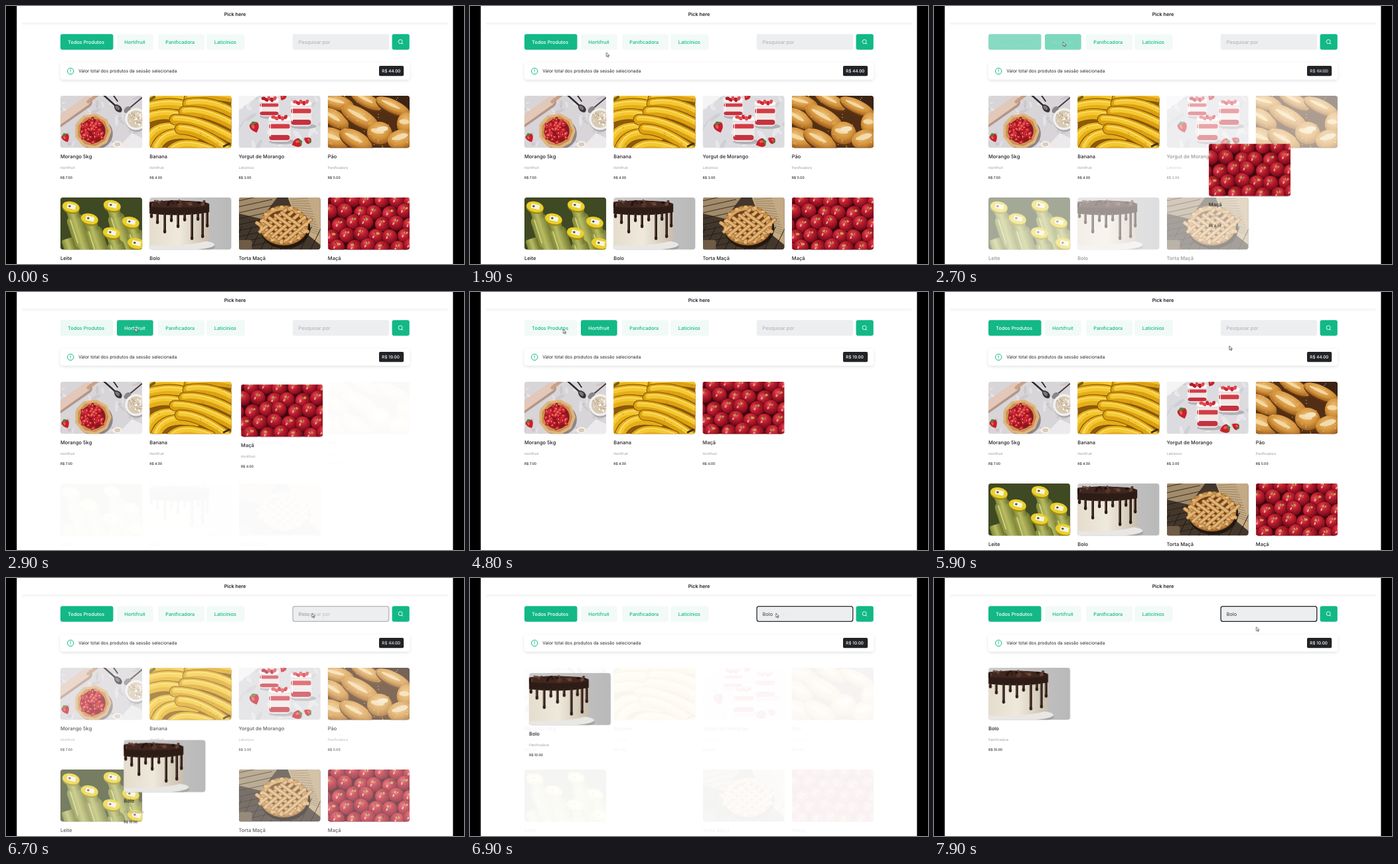
An HTML page for the animation above (8000 ms loop, 690x388 px).

```html
<!DOCTYPE html>
<html lang="pt">
<head>
<meta charset="utf-8">
<title>Pick here</title>
<style>
html, body { margin: 0; width: 100%; height: 100%; overflow: hidden; background: #fff; }
svg { display: block; width: 100vw; height: 100vh; }
text { font-family: Inter, "Open Sans", sans-serif; text-rendering: geometricPrecision; white-space: pre; }
.main, .hort, .all, .keep, .find, .to-third, .to-first {
  animation: 8s cubic-bezier(.4, 0, .1, 1) infinite;
}
.main { animation-name: main; }
.hort { animation-name: hort; }
.all { animation-name: all; }
.keep { animation-name: keep; }
.find { animation-name: find; }
.to-third { animation-name: to-third; }
.to-first { animation-name: to-first; }
.cursor { animation: cursor 8s ease-in-out infinite; }

/* filter at 2556 ms, reset at 4950 ms, search at 6590 ms, 450 ms each */
@keyframes main {
  0%, 31.95% { opacity: 1; }
  37.575%, 61.875% { opacity: 0; }
  67.5%, 100% { opacity: 1; }
}
@keyframes hort {
  0%, 31.95% { opacity: 0; }
  37.575%, 61.875% { opacity: 1; }
  67.5%, 100% { opacity: 0; }
}
@keyframes all {
  0%, 31.95% { opacity: 1; }
  37.575%, 61.875% { opacity: 0; }
  67.5%, 82.375% { opacity: 1; }
  88%, 100% { opacity: 0; }
}
@keyframes keep {
  0%, 82.375% { opacity: 1; }
  88%, 100% { opacity: 0; }
}
@keyframes find {
  0%, 82.375% { opacity: 0; }
  88%, 100% { opacity: 1; }
}
@keyframes to-third {
  0%, 31.95% { transform: translate(0, 0); }
  37.575%, 61.875% { transform: translate(-134.5px, -153px); }
  67.5%, 100% { transform: translate(0, 0); }
}
@keyframes to-first {
  0%, 82.375% { transform: translate(0, 0); }
  88%, 100% { transform: translate(-134.3px, -153px); }
}
@keyframes cursor {
  0%, 10.6% { transform: translate(400px, 235px); opacity: 0; }
  10.7% { transform: translate(400px, 235px); opacity: 1; animation-timing-function: linear; }
  15.6% { transform: translate(338px, 182px); animation-timing-function: linear; }
  23.75% { transform: translate(205.5px, 70px); animation-timing-function: ease-out; }
  26.5%, 50% { transform: translate(194.5px, 54px); }
  53.75%, 65% { transform: translate(140.5px, 56px); }
  73.75% { transform: translate(445px, 81px); }
  79%, 95.6% { transform: translate(461px, 53px); }
  98.75%, 100% { transform: translate(485.5px, 73.5px); opacity: 1; }
}
</style>
</head>
<body>
<svg id="stage" viewBox="0 0 690 388">
  <defs>
    <clipPath id="photo"><rect width="123.2" height="78.3" rx="4"/></clipPath>
    <radialGradient id="apple" cx=".4" cy=".32" r=".7">
      <stop offset="0" stop-color="#e2545a"/><stop offset=".4" stop-color="#c01e30"/><stop offset="1" stop-color="#6d0a18"/>
    </radialGradient>
    <radialGradient id="bread" cx=".45" cy=".35" r=".7">
      <stop offset="0" stop-color="#eebf74"/><stop offset=".55" stop-color="#d4933c"/><stop offset="1" stop-color="#8f5318"/>
    </radialGradient>
    <linearGradient id="wall">
      <stop offset="0" stop-color="#cdcccb"/><stop offset="1" stop-color="#b9b9ba"/>
    </linearGradient>
    <linearGradient id="cream">
      <stop offset="0" stop-color="#e4ddcd"/><stop offset=".5" stop-color="#efe9dc"/><stop offset="1" stop-color="#c9beac"/>
    </linearGradient>
    <linearGradient id="bottle" x1="0" x2="1" y1="0" y2="0">
      <stop offset="0" stop-color="#7f8735"/><stop offset=".45" stop-color="#b9bc62"/><stop offset="1" stop-color="#6a722c"/>
    </linearGradient>
    <linearGradient id="edge" x2="0" y2="1">
      <stop offset="0" stop-color="#f1f1f2"/><stop offset="1" stop-color="#fff"/>
    </linearGradient>
    <filter id="soft" x="-5%" y="-50%" width="110%" height="220%">
      <feDropShadow dx="0" dy="1.5" stdDeviation="2" flood-color="#000" flood-opacity=".13"/>
    </filter>
  </defs>
</svg>
<script>
const GREEN = '#12b886', INK = '#202126';
let seed = 7;
const rnd = (a = 1, b = 0) => {
  seed = (seed * 16807) % 2147483647;
  return b + (a - b) * seed / 2147483647;
};
const pick = list => list[Math.floor(rnd() * list.length)];
const times = (n, fn) => Array.from({ length: n }, (_, i) => fn(i)).join('');

const box = (x, y, w, h, fill, r = 0, more = '') =>
  `<rect x="${x}" y="${y}" width="${w}" height="${h}" rx="${r}" fill="${fill}" ${more}/>`;
const oval = (x, y, rx, ry, fill, turn = 0) =>
  `<ellipse cx="${x}" cy="${y}" rx="${rx}" ry="${ry}" fill="${fill}" transform="rotate(${turn} ${x} ${y})"/>`;
const shape = (d, fill) => `<path d="${d}" fill="${fill}"/>`;
const line = (d, w, color) =>
  `<path d="${d}" fill="none" stroke="${color}" stroke-width="${w}" stroke-linecap="round" stroke-linejoin="round"/>`;
const text = (x, y, str, size, fill = INK, weight = 400, more = '') =>
  `<text x="${x}" y="${y}" font-size="${size}" fill="${fill}" font-weight="${weight}" ${more}>${str}</text>`;
const group = (cls, body) => `<g class="${cls}">${body}</g>`;
const full = fill => box(0, 0, 124, 79, fill);

const berry = (x, y, s, turn) =>
  `<g transform="translate(${x} ${y}) rotate(${turn}) scale(${s})">` +
  shape('M0 7Q-7 1-5-4Q0-7 5-4Q7 1 0 7', '#c8202c') + oval(-1.5, -1, 1.6, 2.4, '#ea5a58') +
  shape('M-5-4L0-7L5-4L0-3Z', '#5c7a35') + '</g>';

function strawberryPie() {
  const rim = times(9, i => {
    const a = i * Math.PI * 2 / 9;
    return `${i ? 'L' : 'M'}${49 + 26 * Math.cos(a)} ${53 + 25 * Math.sin(a)}`;
  }) + 'Z';
  return full('#d8d5d8') +
    times(40, () => oval(rnd(124), rnd(79), rnd(9, 2), rnd(3, 1), pick(['#e4e2e4', '#cbc8cd']), rnd(180))) +
    line('M-6 42L40 10', 16, '#b69585') + line('M-6 40L39 8', 13, '#e2c8b8') + line('M42 9L58-3', 5, '#c99f84') +
    line('M64-2L82 14', 2.5, '#2c2a2d') + oval(87, 19, 7, 4.5, '#37353a', 45) + oval(86, 18, 4, 2.4, '#77747a', 45) +
    line('M79-2L86 8', 2, '#3a3434') + line('M124 2L106 17', 2, '#4a3f3c') + oval(101, 21, 6, 4, '#8c8482', -40) +
    oval(115, 37, 17, 17, '#a9a5aa') + oval(114, 35, 16.5, 16.5, '#f2f0ef') + oval(114, 35, 13, 13, '#d8c9b2') +
    times(45, () => oval(rnd(124, 104), rnd(45, 26), 1.4, .9, pick(['#efe5d3', '#b8a387', '#fff']), rnd(180))) +
    shape('M86 79L108 56L124 64V79Z', '#eceaec') +
    oval(52, 57, 27, 24, '#8d8488') + shape(rim, '#c98f53') + line(rim, 4, '#e0b57c') + oval(49, 53, 19, 18, '#8f1620') +
    times(48, () => {
      const a = rnd(6.28), r = 18 * Math.sqrt(rnd());
      const x = 49 + r * Math.cos(a), y = 53 + r * Math.sin(a), t = rnd(180);
      return oval(x, y, 3.8, 2.4, pick(['#c91f2d', '#b11824', '#dc3b3e']), t) + oval(x, y, 1.7, .8, '#ef8b80', t);
    }) +
    berry(8, 63, 1.05, -25) + oval(86, 73, 7, 5, '#f4f2f2') + oval(86, 73, 4.5, 3, '#dccbb5');
}

function bananas() {
  const curves = [
    'M-5 4Q30-6 62 8', 'M60 4Q90-6 130 4', 'M-5 18Q40 4 78 24', 'M58 12Q94 6 130 28',
    'M-5 34Q30 18 74 42', 'M52 24Q84 20 130 46', 'M-6 82Q-2 44 40 48', 'M38 36Q72 34 128 66',
    'M8 84Q18 48 70 60', 'M46 50Q76 50 118 82', 'M30 86Q46 64 92 82'];
  return full('#8a5b0c') + curves.map((d, i) =>
    line(d, 17, '#7d510a') + line(d, 15, i % 2 ? '#dca012' : '#e6ae18') +
    `<g transform="translate(0 -2)">${line(d, 7, '#f4c830')}</g>` +
    `<g transform="translate(0 -4)">${line(d, 1.3, '#fae07a')}</g>`).join('') +
    line('M-3 8L7 2', 4, '#77611b') + line('M112 76L120 72', 3, '#3f300e') +
    times(18, () => oval(rnd(124), rnd(78), .8, .4, '#8a5d14', rnd(180)));
}

function jar(x, y, w, h) {
  const mid = x + w / 2;
  return oval(mid + 4, y + h, w * .6, 4, '#b2b1b7') + box(x, y, w, h, '#f0e9e8', 6) +
    box(x + 1, y + h * .3, w - 2, h * .18, '#d23c46', 2) + box(x + 1, y + h * .74, w - 2, h * .2, '#c4323f', 4) +
    oval(mid, y + 3, w / 2, 4.5, '#fdfbfa') +
    times(5, i => oval(x + w * (.22 + i * .14), y + 1 + (i % 2) * 2, 3.4, 2.6, pick(['#cf2534', '#e24a50', '#b31a2a']), 30 * i)) +
    line(`M${x + 3} ${y + 9}V${y + h - 8}`, 1, '#fff') + line(`M${x} ${y + 8}H${x + w}`, .6, '#c9c4c8');
}

const yogurt = () => full('#dcdce0') +
  times(30, () => oval(rnd(124), rnd(79), rnd(12, 3), rnd(4, 1), pick(['#e8e8eb', '#cfd0d6']), rnd(180))) +
  shape('M0 0H30L0 22Z', '#f4f4f5') + jar(31, 3, 30, 28) + jar(78, 8, 32, 38) + jar(45, 31, 33, 38) +
  berry(24, 47, 1.3, -20) + berry(88, 71, 1.2, 70) + berry(104, 67, .9, 120) + berry(67, 2, .8, 30);

const rolls = () => full('#512e14') + shape('M70 0H124V24Z', '#3c2415') +
  [[14, 10, 26, 11, 15], [58, 7, 26, 10, 28], [98, 16, 28, 10, 25], [10, 34, 24, 12, 32], [48, 32, 32, 13, 30],
    [8, 64, 26, 15, 20], [42, 66, 27, 13, 28], [118, 42, 14, 17, 5], [78, 56, 19, 17, 10], [110, 66, 20, 15, -10]]
    .map(([x, y, a, b, t]) => oval(x + 1, y + 2, a + 1, b + 1, '#5f3410', t) + oval(x, y, a, b, 'url(#bread)', t) +
      oval(x - 3, y - 3, a * .55, b * .22, '#f4d9a2', t)).join('') +
  oval(82, 50, 9, 4, '#f4e3c0', -8) + oval(111, 61, 10, 4, '#f0dcb4', -15) +
  times(60, () => oval(rnd(124), rnd(79), .7, .5, '#f6e4bd'));

const bottles = () => full('#3f4923') +
  [[78, 12], [16, 14], [44, 32], [106, 37], [77, 53], [114, 69], [10, 62]].map(([x, y], i) =>
    `<g transform="rotate(-18 ${x} ${y})">` + box(x - 13, y + 13, 26, 62, 'url(#bottle)', 9) +
    box(x - 9, y, 18, 20, 'url(#bottle)', 3) + line(`M${x - 7} ${y + 18}V${y + 55}`, 1.6, '#d4d68c') + '</g>' +
    (i < 6 ? oval(x, y + 2, 13, 8.5, '#9f8b16', 12) + oval(x, y, 13, 8, '#ead02b', 12) +
      box(x - 6, y - 4, 13, 7, '#f5f3e4', 1, `transform="rotate(14 ${x} ${y})"`) +
      oval(x - 2, y - 1, 1.8, 1.6, '#514b28') : '')).join('');

function cake() {
  const drips = [[3, 28], [12, 37], [23, 51], [33, 34], [43, 43], [53, 33], [64, 61], [73, 32], [80, 58], [87, 42]];
  return full('url(#wall)') + oval(35, 74, 64, 10, '#a5a3a2') + oval(35, 71, 63, 9, '#e9e7e4') +
    shape('M-2 12H90V64Q60 74-2 72Z', 'url(#cream)') +
    shape('M-2 8Q40 0 90 10V22Q50 30-2 24Z', '#2e1c17') + oval(40, 10, 50, 5.5, '#40271f') +
    drips.map(([x, y]) => line(`M${x} 18V${y}`, 3.6, '#2e1c17') + oval(x, y, 2.2, 3, '#2e1c17') +
      line(`M${x - .8} 24V${y - 2}`, .6, '#75584b')).join('') +
    times(26, () => oval(rnd(86), rnd(12, 5), rnd(4, 1.5), rnd(2.2, 1), pick(['#573528', '#24140f', '#6b4638']), rnd(180)));
}

function applePie() {
  const lattice = [-24, -12, 0, 12, 24].map(k =>
    [`M${k - 28} ${k * -.4 - 12}L${k + 22} ${k * -.4 + 24}`, `M${k - 22} ${k * .4 + 24}L${k + 28} ${k * .4 - 18}`]).flat();
  return full('#43372c') + shape('M0 0H58L34 32L0 24Z', '#a18b6a') + shape('M74 0H124V72L92 46Z', '#c3aa84') +
    times(15, i => line(`M${78 + i} ${3 + i * 3}L${104 + i * 1.4} ${1 + i * 4}`, .5, '#6d5c47')) +
    times(9, i => line(`M0 ${i * 9 + 5}L50 ${i * 9 - 6}`, .8, '#1d1814')) +
    times(9, i => line(`M${i * 15 - 12} 79L${i * 15 + 5} 44`, .9, '#1b1613')) +
    oval(70, 46, 38, 31, '#211812') + oval(68, 42, 37, 30, '#a86a2d') + oval(68, 41, 34, 27, '#d6a562') +
    oval(68, 41, 28, 22, '#70401c') + `<g transform="translate(68 40) scale(.78)">` +
    lattice.map(d => line(d, 7.5, '#8f5827') + line(d, 6, '#d8a866') + line(d, 1.2, '#edcc95')).join('') + '</g>' +
    times(30, i => oval(68 + 34 * Math.cos(i * .21), 41 + 27 * Math.sin(i * .21), 2.6, 2, i % 2 ? '#c38a48' : '#e3ba7c')) +
    box(0, 64, 20, 15, '#6f5b46', 3);
}

const apples = () => full('#41060e') + times(5, row => times(7, col => {
  const x = col * 22 - 6 + (row % 2) * 11 + rnd(3, -3), y = row * 18 + 3 + rnd(3, -3);
  return oval(x, y, 12, 11.5, '#4e0711') + oval(x, y, 11.5, 11, 'url(#apple)', rnd(40, -40)) +
    oval(x + rnd(3, -3), y - 4, 3.2, 1.8, '#d49a5a') + line(`M${x} ${y - 3}l${rnd(3, -3)} -4`, .9, '#3c2412') +
    oval(x - 4, y + 1, 1.2, 2.2, '#f3a6a4', 25);
}));

const products = [
  ['Morango 5kg', 'Hortifruit', '7.00', strawberryPie, 'keep', ''],
  ['Banana', 'Hortifruit', '4.00', bananas, 'keep', ''],
  ['Yorgut de Morango', 'Laticínios', '3.00', yogurt, 'all', ''],
  ['Pão', 'Panificadora', '5.00', rolls, 'all', ''],
  ['Leite', 'Laticínios', '3.00', bottles, 'all', ''],
  ['Bolo', 'Panificadora', '10.00', cake, 'main', 'to-first'],
  ['Torta Maçã', 'Panificadora', '8.00', applePie, 'all', ''],
  ['Maçã', 'Hortifruit', '4.00', apples, 'keep', 'to-third']
];
const card = ([name, kind, price, photo, fade, move], i) =>
  `<g transform="translate(${81.9 + (i % 4) * 134.3} ${135 + (i >> 2) * 153})">` +
  group(move, group(fade, `<g clip-path="url(#photo)">${photo()}</g>` +
    text(0, 94.2, name, 7.5, INK, 500) + text(0, 110.3, kind, 5.1, '#95979c') +
    text(0, 124.8, 'R$ ' + price, 5.1, INK, 500))) + '</g>';

const tab = (x, w, tx, label, active) => {
  const face = (bg, fg) => box(x, 42.3, w, 23.4, bg, 3) + text(tx, 56.7, label, 7.3, fg, 500);
  return face('#f2faf8', GREEN) + (active ? group(active, face(GREEN, '#fff')) : '');
};
const total = (cls, sum) => group(cls, text(566.3, 99.9, 'R$ ' + sum, 6.4, '#fff', 500));

document.getElementById('stage').insertAdjacentHTML('beforeend',
  box(0, 0, 690, 388, '#fff') + box(24, 25, 642, 4.5, 'url(#edge)') +
  text(345, 15.1, 'Pick here', 7.3, INK, 600, 'text-anchor="middle"') +
  tab(82, 79.5, 93.3, 'Todos Produtos', 'main') + tab(167, 54.7, 178.3, 'Hortifruit', 'hort') +
  tab(229, 70, 240.3, 'Panificadora') + tab(302.3, 57.5, 313.8, 'Laticínios') +
  box(431.8, 42.3, 145.4, 23.4, '#eceef0', 3) +
  group('keep', text(440.8, 56.7, 'Pesquisar por', 7.3, '#a9acb2')) +
  group('find', box(432.2, 42.7, 144.6, 22.6, 'none', 3, `stroke="${INK}" stroke-width="1.3"`) +
    text(440.8, 56.7, 'Bolo', 7.3, '#33353b')) +
  box(581.6, 42.3, 26.2, 23.4, GREEN, 3) +
  '<circle cx="594.2" cy="53.6" r="3" fill="none" stroke="#fff" stroke-width=".9"/>' + line('M596.4 55.8L598 57.4', .9, '#fff') +
  box(81.8, 85.2, 526.4, 25.4, '#fff', 4, 'filter="url(#soft)"') +
  `<circle cx="97.2" cy="98" r="4.7" fill="none" stroke="${GREEN}" stroke-width="1"/>` +
  line('M97.2 95.6V98.2M97.2 100.1V100.2', .9, GREEN) +
  text(109.3, 100.4, 'Valor total dos produtos da sessão selecionada', 6.65) +
  box(562, 90, 37.2, 15.2, '#222327', 2) +
  total('all', '44.00') + total('hort', '19.00') + total('find', '10.00') +
  products.map(card).join('') +
  box(0, 0, 16.2, 388, '#000') + box(673.4, 0, 16.6, 388, '#000') +
  group('cursor', '<path d="M0 0V6.2L1.5 4.9L2.5 7.2L3.6 6.7L2.6 4.5H4.5Z" fill="#fff" stroke="#333" stroke-width=".7" stroke-linejoin="round"/>'));
</script>
</body>
</html>
```
